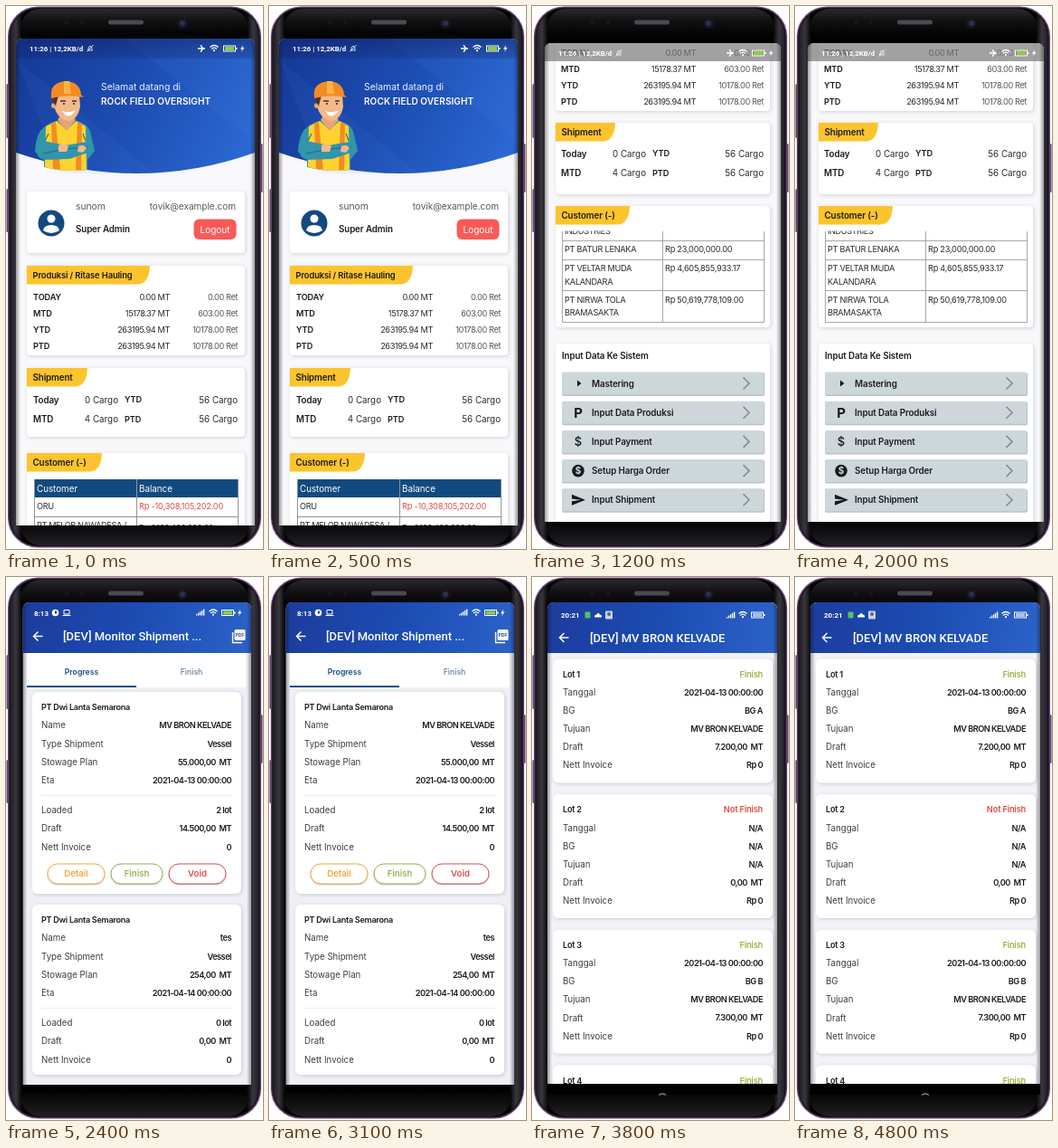
Write an HTML page with a canvas that moves like this. It is 284 by 600 pixels and loops after 5200 ms.

```html
<!DOCTYPE html>
<html lang="id">
<head>
<meta charset="utf-8">
<title>Mobile app tour</title>
<style>
html, body { margin: 0; width: 100%; height: 100%; overflow: hidden; background: #fff; }
canvas { display: block; width: 284px; height: 600px; }
</style>
</head>
<body>
<canvas id="stage" width="284" height="600"></canvas>
<script>
const ctx = document.getElementById('stage').getContext('2d');
const LOOP = 5200;
const INK = '#2b2b30', GREY = '#55565c', RED = '#e04a40', GREEN = '#a3ae43', NAVY = '#124a80';

const BODY = { size: 9.8, weight: 400, color: INK, align: 'left', gap: 0, font: 'Inter' };
const BOLD = { weight: 600, color: '#1b1b1f', gap: -.12 };
const TIGHT = { size: 9.2, gap: -.4 };
const VALUE = { ...BOLD, size: 9.2, gap: -.5, align: 'right' };
const TITLE = { size: 13, weight: 500, color: '#fff', font: 'Roboto' };
const STATUS = { size: 8, weight: 700, color: '#fff', font: 'Roboto' };

// y is the optical middle of the line
function text(str, x, y, style = {}) {
  const s = { ...BODY, ...style };
  ctx.font = `${s.weight} ${s.size}px ${s.font}, sans-serif`;
  ctx.letterSpacing = s.gap + 'px';
  ctx.textAlign = s.align;
  ctx.fillStyle = s.color;
  ctx.fillText(str, x, y + s.size * .36);
}

function box(x, y, w, h, fill, r = 0) {
  ctx.fillStyle = fill;
  ctx.beginPath();
  ctx.roundRect(x, y, w, h, r);
  ctx.fill();
}

function disc(x, y, r, fill) {
  ctx.fillStyle = fill;
  ctx.beginPath();
  ctx.arc(x, y, r, 0, 7);
  ctx.fill();
}

function shape(d, fill, x = 0, y = 0) {
  ctx.save();
  ctx.translate(x, y);
  ctx.fillStyle = fill;
  ctx.fill(new Path2D(d));
  ctx.restore();
}

function line(d, color, width = 1, x = 0, y = 0) {
  ctx.save();
  ctx.translate(x, y);
  ctx.strokeStyle = color;
  ctx.lineWidth = width;
  ctx.stroke(new Path2D(d));
  ctx.restore();
}

function card(x, y, w, h, r = 4) {
  ctx.save();
  ctx.shadowColor = 'rgba(40,50,80,.2)';
  ctx.shadowBlur = 4;
  ctx.shadowOffsetX = ctx.shadowOffsetY = 1;
  box(x, y, w, h, '#fff', r);
  ctx.restore();
}

function gradient(x0, y0, x1, y1, ...colors) {
  const g = ctx.createLinearGradient(x0, y0, x1, y1);
  colors.forEach((c, i) => g.addColorStop(i / (colors.length - 1), c));
  return g;
}

function tag(label, x, y, w) {
  shape(`M0 0H${w}Q${w - 1} 20.5 ${w - 14} 20.5H0Z`, '#fcc42c', x, y);
  text(label, x + 6.5, y + 10.5, { ...BOLD, size: label.length > 20 ? 9.4 : 9.8 });
}

function wifi(x, y, color = '#fff') {
  line('M-4.5 -1.5Q0 -5.5 4.5 -1.5M-3 .5Q0 -2.5 3 .5', color, 1.2, x, y);
  disc(x, y + 2.2, 1.1, color);
}

function battery(x, y, fill) {
  ctx.strokeStyle = '#fff';
  ctx.lineWidth = 1;
  ctx.strokeRect(x - 6.5, y - 3, 13, 6);
  box(x - 5, y - 2, 10, 4, fill);
  box(x + 7, y - 1, 1.5, 2, '#fff');
}

function bolt(x, y) { shape('M1 -4L-2 .8H0L-1 4L2.4 -1H.4Z', '#fff', x, y); }

function signal(x, y) {
  for (let i = 0; i < 5; i++) box(x + i * 2, y + 2 - i * 1.4, 1.3, 1.5 + i * 1.4, '#fff');
}

function homeStatus(x, y) {
  text('11:26 | 12,2KB/d', x, y, { ...STATUS, size: 7.9 });
  line('M-2.5 2H2.5L1.7 0V-1.5Q0 -4 -1.7 -1.5V0ZM-3.5 3.5L3.5 -4', '#fff', .8, x + 67, y);
  shape('M-4 -.8L0 -.8L-1.5 -4H-.3L2 -.8H4V.8H2L-.3 4H-1.5L0 .8H-4Z', '#fff', x + 190, y);
  wifi(x + 204, y);
  battery(x + 221, y, '#8ccf3f');
  bolt(x + 235, y);
}

function phone() {
  const button = '#64446f';
  box(0, 0, 284, 600, '#fff');
  box(.5, 86, 4, 60, button, 1.5);
  box(.5, 202, 4, 48, button, 1.5);
  box(280, 152, 3.5, 54, button, 1.5);
  box(2, .5, 280, 598, '#6a4878', 33);
  box(3.3, 1.8, 277.4, 595.4, '#17131b', 32);
  box(4.5, 3, 275, 593, gradient(4, 0, 18, 0, '#1d1a20', '#3a363e', '#020203'), 31);
  box(142, 3, 137.5, 593, gradient(266, 0, 280, 0, '#020203', '#3a363e', '#1d1a20'), [0, 31, 31, 0]);
  box(16, 3, 252, 30, gradient(0, 3, 0, 30, '#2a292d', '#111113', '#050506'), [22, 22, 0, 0]);
  box(16, 570, 252, 26, gradient(0, 570, 0, 596, '#050506', '#111113', '#222125'), [0, 0, 22, 22]);
  box(113, 15.5, 39, 5, '#4a4a50', 2.5);
  disc(195, 19, 6, '#15171f');
  disc(195, 19, 3, '#29324a');
  for (const x of [67, 84]) disc(x, 18, 2.5, '#17181d');
}

function screen(x, y, w, h, r, bg, draw) {
  ctx.save();
  ctx.beginPath();
  ctx.roundRect(x, y, w, h, r);
  ctx.clip();
  box(x, y, w, h, bg);
  draw();
  // curved glass darkens towards both sides
  box(x, y, 5, h, gradient(x, 0, x + 5, 0, 'rgba(20,18,24,.4)', 'rgba(20,18,24,0)'));
  box(x + w - 5, y, 5, h, gradient(x + w - 5, 0, x + w, 0, 'rgba(20,18,24,0)', 'rgba(20,18,24,.4)'));
  ctx.restore();
}

function miner() {
  const teal = '#3195ac', deep = '#1f6d88', skin = '#f3b98a', orange = '#f28c22', yellow = '#ffd32f';
  shape('M38 138Q46 129 56 127H77Q89 129 93 138L98 160L90 170V181Q66 184 42 178V170L32 161Q33 145 38 138Z', teal);
  shape('M44 133L56 127L67 137L78 127L88 133L89 181Q66 184 43 178Z', yellow);
  shape('M50 130L55 128L60 181L52 180ZM79 128L84 130L83 181H77Z', orange);
  shape('M57 126L67 138L77 126L73 121H60Z', '#e6a576');
  shape('M33 156Q34 149 41 149L66 154L89 150Q98 151 97 160L70 169L42 170Q33 168 33 156Z', teal);
  line('M41 163L66 158L91 156M43 149L47 141M88 149L85 141', deep, 1.1);
  shape('M58 154Q64 150 69 155L67 161H58ZM80 155Q86 152 89 157L85 162L79 161Z', skin);
  shape('M53 99H81L82 111Q79 127 68 127Q57 125 53 111Z', skin);
  disc(53, 110, 3, '#e6a576');
  shape('M51 99H58L55 110L52 107Z', '#53321f');
  shape('M50 100Q48 85 66 83Q82 84 83 98L86 101Q68 97 50 102Z', orange);
  shape('M64 83H70L72 97H64Z', '#ffb243');
  line('M60 105H66M73 105H78', '#53321f', 1.3);
  disc(64, 108, 1, '#332015');
  disc(75, 108, 1, '#332015');
  shape('M62 116Q69 119 77 115Q73 123 66 121Z', '#fff');
}

const HAULING = [
  ['TODAY', '0.00 MT', '0.00 Ret'],
  ['MTD', '15178.37 MT', '603.00 Ret'],
  ['YTD', '263195.94 MT', '10178.00 Ret'],
  ['PTD', '263195.94 MT', '10178.00 Ret']
];

function hauling(x, y) {
  HAULING.forEach(([name, tons, trips], i) => {
    const row = y + i * 17.9;
    text(name, x, row, { ...BOLD, size: 9.2 });
    text(tons, 181, row, { ...TIGHT, align: 'right' });
    text(trips, 256, row, { ...TIGHT, align: 'right', color: GREY });
  });
}

function shipment(x, y) {
  [['Today', '0 Cargo', 'YTD'], ['MTD', '4 Cargo', 'PTD']].forEach(([a, count, b], i) => {
    const row = y + i * 21.5;
    text(a, x, row, BOLD);
    text(count, x + 94, row, { align: 'right' });
    text(b, x + 101, row, { ...BOLD, size: 9.2 });
    text('56 Cargo', 256, row, { align: 'right' });
  });
}

function home() {
  screen(11, 36, 264, 538, [7, 7, 0, 0], '#f8f8fa', () => {
    shape('M11 36H275V162Q146 208 11 162Z', gradient(20, 50, 260, 170, '#153a98', '#1d4db2', '#2b68d2'));
    ctx.globalAlpha = .08;
    shape('M130 36L275 150V36ZM12 60L165 185H60Z', '#4a8cf0');
    ctx.globalAlpha = 1;
    box(11, 36, 264, 22, gradient(0, 36, 0, 58, 'rgba(16,28,90,.45)', 'rgba(16,28,90,.2)'));
    homeStatus(26, 47);
    miner();
    text('Selamat datang di', 105, 89, { size: 10.4, color: '#eaf1ff' });
    text('ROCK FIELD OVERSIGHT', 105, 105, { size: 10, weight: 600, color: '#fff', gap: .1 });

    card(23, 205, 241, 68);
    disc(50, 240, 14.5, NAVY);
    disc(50, 235, 4.5, '#fff');
    shape('M41 248Q42 242 50 242Q58 242 59 248Q50 254 41 248Z', '#fff');
    text('sunom', 77, 221, { size: 10.3, color: GREY });
    text('tovik@example.com', 254, 221, { size: 10, color: GREY, align: 'right' });
    text('Super Admin', 77, 246, BOLD);
    box(207.5, 235.5, 47, 22.5, '#f95a58', 6);
    text('Logout', 231, 247, { size: 10, color: '#fff', align: 'center' });

    card(23, 287, 241, 99);
    tag('Produksi / Ritase Hauling', 23, 287, 136);
    hauling(30, 322);
    card(23, 400, 241, 76);
    tag('Shipment', 23, 400, 67);
    shipment(30, 435);

    card(23, 494, 241, 90);
    tag('Customer (-)', 23, 494, 83);
    box(31, 523, 225, 20, NAVY);
    line('M31.5 523V574M256.5 523V574M144.5 523V574M31 564.5H256', '#8d959c');
    text('Customer', 34, 533, { color: '#fff' });
    text('Balance', 147, 533, { color: '#fff' });
    text('ORU', 34, 553, TIGHT);
    text('Rp -10,308,105,202.00', 147, 553, { ...TIGHT, gap: -.2, color: RED });
    text('PT MELOR NAWADESA /', 34, 574, TIGHT);
    text('Rp 6,120,400,000.00', 147, 577, TIGHT);
  });
}

const CUSTOMERS = [
  [269, 'PT BATUR LENAKA', '', 'Rp 23,000,000.00'],
  [290, 'PT VELTAR MUDA', 'KALANDARA', 'Rp 4,605,855,933.17'],
  [324.5, 'PT NIRWA TOLA', 'BRAMASAKTA', 'Rp 50,619,778,109.00']
];

function menuIcon(i, y) {
  const glyph = { size: 15, weight: 700, align: 'center', color: '#16191c' };
  if (i === 0) shape('M-2 -3.5L2.5 0L-2 3.5Z', '#16191c', 52, y);
  if (i === 1) text('P', 51, y, glyph);
  if (i === 2) text('$', 51, y, { ...glyph, size: 13, weight: 500 });
  if (i === 3) {
    disc(51, y, 6.8, '#16191c');
    text('$', 51, y, { ...glyph, size: 10, color: '#cdd7da' });
  }
  if (i === 4) shape('M-7 -6L8 0L-7 6V1.4L3 0L-7 -1.4Z', '#16191c', 51, y);
}

function menu() {
  screen(14, 41, 261, 529, [7, 7, 0, 0], '#f8f8fa', () => {
    card(26, 20, 237, 96);
    hauling(32, 51.5);
    box(14, 41, 261, 20, 'rgba(125,125,125,.72)');
    homeStatus(29, 52);

    card(26, 129, 237, 79);
    tag('Shipment', 26, 129, 66);
    shipment(32, 163);

    card(26, 221, 237, 134);
    text('INDUSTRIES', 36, 249, TIGHT);
    box(27, 240, 235, 8.5, '#fff');
    tag('Customer (-)', 26, 221, 82);
    line('M33.5 249V349.5H256.5V249M144.5 249V349M33 259.5H256M33 280.5H256M33 314.5H256', '#a5a8ab');
    for (const [y, first, second, sum] of CUSTOMERS) {
      text(first, 36, y, { ...TIGHT, gap: -.3 });
      text(second, 36, y + 14.5, { ...TIGHT, gap: -.3 });
      text(sum, 147, y, { ...TIGHT, gap: -.25 });
    }

    card(26, 373, 237, 210);
    text('Input Data Ke Sistem', 33, 386, BOLD);
    ['Mastering', 'Input Data Produksi', 'Input Payment', 'Setup Harga Order', 'Input Shipment'].forEach((label, i) => {
      const y = 417 + i * 32.2;
      box(33, y - 12, 224, 26, '#b9c3c7', 2);
      box(33, y - 12.5, 223, 25, '#cdd7da', 2);
      menuIcon(i, y);
      text(label, 66, y, BOLD);
      line('M-3.5 -6.5L3 0L-3.5 6.5', '#848c90', 1.6, 237, y);
    });
  });
}

function appBar(x, w, title, titleX, y) {
  box(x, 28, w, 56, gradient(x, 28, x + w, 70, '#1d3c9d', '#1c4cb2', '#2c62c8'));
  line('M5 0H-4.5M0 -5L-5 0L0 5', '#fff', 1.5, 35.5, y);
  text(title, titleX, y, TITLE);
}

function field(x, right, y, name, value) {
  text(name, x, y, { size: 9.7, color: '#3c3c42' });
  text(value, right, y, VALUE);
}

function pill(label, x, w, color) {
  ctx.save();
  ctx.shadowColor = 'rgba(0,0,0,.3)';
  ctx.shadowBlur = 2;
  ctx.shadowOffsetY = 1;
  box(x, 317, w, 22, '#fff', 11);
  ctx.restore();
  ctx.strokeStyle = color;
  ctx.lineWidth = 1;
  ctx.stroke();
  text(label, x + w / 2, 328, { size: 9.6, weight: 600, color, align: 'center' });
}

function vessel(y, height, name, plan, eta, loaded, draft) {
  card(29, y, 231, height, 6);
  text('PT Dwi Lanta Semarona', 39, y + 17, { ...BOLD, size: 9.1, gap: -.3 });
  const rows = [['Name', name], ['Type Shipment', 'Vessel'], ['Stowage Plan', plan], ['Eta', eta],
    ['Loaded', loaded], ['Draft', draft], ['Nett Invoice', '0']];
  rows.forEach(([label, value], i) =>
    field(39, 249, y + 37 + i * 20.2 + (i > 3 ? 13 : 0), label, value));
  box(39, y + 114, 211, 1, '#ececef');
}

function monitor() {
  screen(18.5, 28, 252.5, 533, [7, 7, 0, 0], '#eef0f5', () => {
    appBar(18, 253, '[DEV] Monitor Shipment ...', 63, 65.5);
    text('8:13', 31, 40, STATUS);
    disc(54.5, 39.5, 3.8, '#fff');
    box(54, 37.5, 2, 3, '#1a3a9a');
    line('M-3 -3H3V1.5H-3ZM-4.5 3H4.5', '#fff', 1, 67, 39.5);
    signal(210, 39);
    wifi(229, 39.5);
    battery(245, 39.5, '#8ccf3f');
    bolt(258, 39.5);
    line('M250.5 61V72.5H261', '#fff', 1.4);
    box(252.5, 58, 12, 12, '#fff', 1.5);
    text('PDF', 258.5, 64, { size: 5, weight: 700, color: '#1d4bb0', align: 'center' });

    box(23, 84, 242, 38, '#fff');
    box(23, 120, 121, 2, '#17508f');
    text('Progress', 83.5, 105, { size: 8.7, weight: 600, color: '#17508f', align: 'center' });
    text('Finish', 205, 105, { size: 8.7, weight: 500, color: '#607d9f', align: 'center' });

    vessel(127, 223, 'MV BRON KELVADE', '55.000,00  MT', '2021-04-13 00:00:00', '2 lot', '14.500,00  MT');
    pill('Detail', 46, 63, '#eca93c');
    pill('Finish', 116, 57, '#93b356');
    pill('Void', 180, 63, '#d2504e');
    vessel(362, 188, 'tes', '254,00  MT', '2021-04-14 00:00:00', '0 lot', '0,00  MT');
  });
}

function lot(n, date, barge, target, draft) {
  const y = 107.5 + (n - 1) * 149.6;
  card(23, y - 17, 243, 137, 6);
  text('Lot ' + n, 34, y, { ...BOLD, size: 9.2, gap: -.25 });
  text(date ? 'Finish' : 'Not Finish', 255, y, { ...VALUE, gap: -.15, color: date ? GREEN : RED });
  [['Tanggal', date || 'N/A'], ['BG', barge], ['Tujuan', target], ['Draft', draft + '  MT'], ['Nett Invoice', 'Rp 0']]
    .forEach(([label, value], i) => field(34, 255, y + 20.1 * (i + 1), label, value));
}

function lots() {
  screen(17, 28, 254, 532, [7, 7, 0, 0], '#f2f3f6', () => {
    const date = '2021-04-13 00:00:00', ship = 'MV BRON KELVADE';
    lot(1, date, 'BG A', ship, '7.200,00');
    lot(2, '', 'N/A', 'N/A', '0,00');
    lot(3, date, 'BG B', ship, '7.300,00');
    lot(4, date, 'BG C', ship, '7.100,00');
    appBar(17, 254, '[DEV] ' + ship, 64, 67);
    text('20:21', 32, 42, STATUS);
    box(58.5, 38.5, 6, 7, '#58bd6a', 1);
    shape('M-4 2.5Q-4 -.5 -1.5 -.5Q0 -4 2 -.5Q4.5 0 4 2.5Z', '#fff', 73, 42);
    box(81, 37.5, 8, 9, '#c8d4ea', 1);
    disc(85, 41, 2, '#56688e');
    signal(215, 42);
    wifi(233, 42);
    battery(249, 42, '#a9bde8');
  });
  box(17, 560, 254, 12, '#000');
  line('M140 572.5Q144 569.5 148 572.5', '#8a8a8e', 1.3);
}

const SCENES = [[0, home], [1200, menu], [2400, monitor], [3800, lots]];
let shown;

function frame() {
  const time = performance.now() % LOOP;
  const scene = SCENES.findLast(([start]) => time >= start)[1];
  if (scene !== shown) {
    shown = scene;
    phone();
    scene();
  }
  requestAnimationFrame(frame);
}
frame();
</script>
</body>
</html>
```
